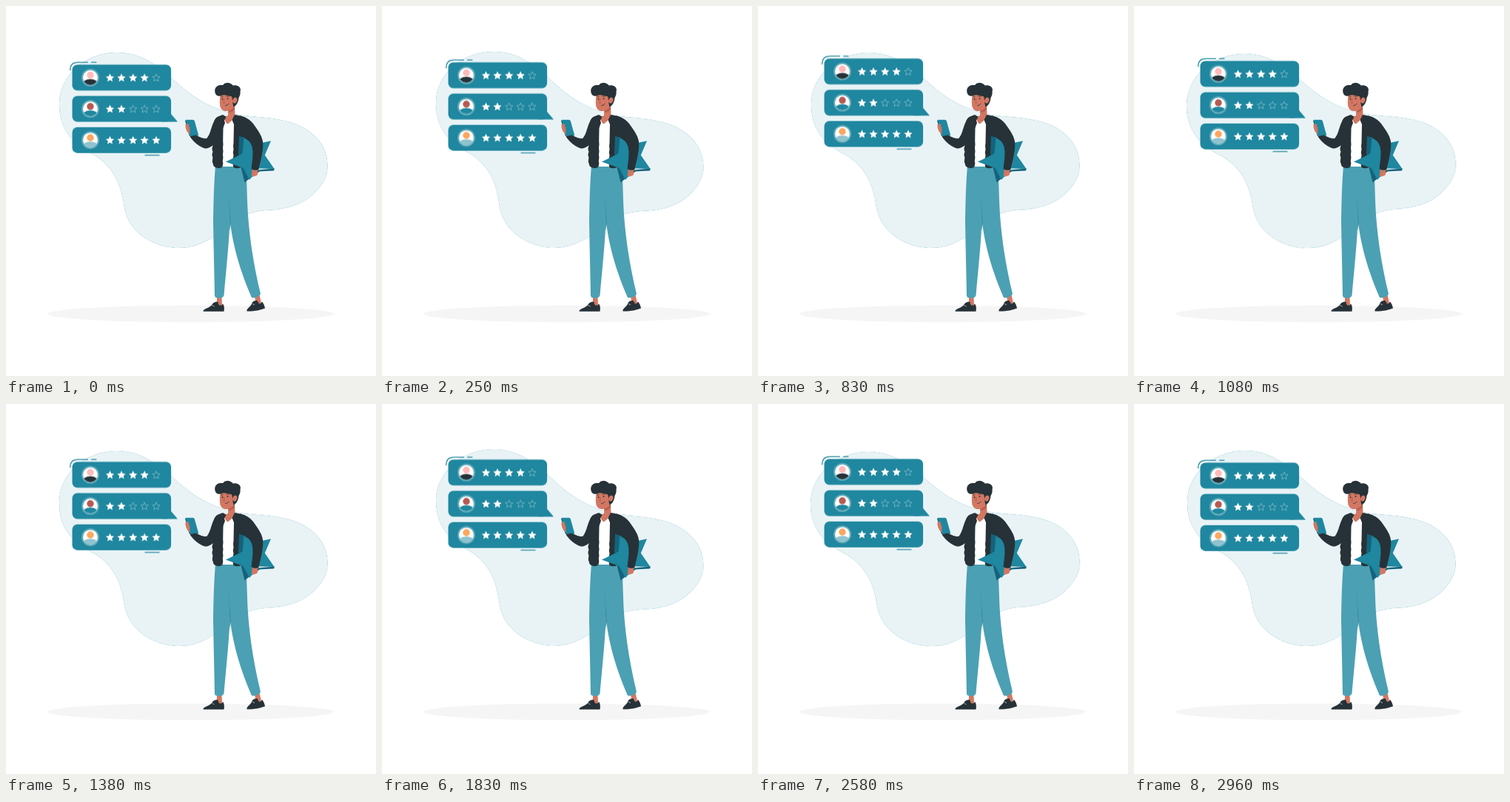
These frames come from a looping animation (500x500 px, 3000 ms). An HTML page:

```html
<!DOCTYPE html>
<html lang="en">
<head>
<meta charset="utf-8">
<title>Customer ratings</title>
<style>
  html, body { margin: 0; width: 100%; height: 100%; overflow: hidden; background: #fff; }
  svg { display: block; width: 100vw; height: 100vh; }

  .teal { fill: #1f879f; }
  .deep { fill: #14637a; }
  .pants { fill: #4ca0b3; }
  .dark { fill: #263238; }
  .skin { fill: #d27762; }
  .white { fill: #fff; }
  .line { fill: none; stroke: #1f879f; stroke-width: 1.2; stroke-linecap: round; }
  .ink { fill: none; stroke: #263238; stroke-width: .8; stroke-linecap: round; }

  /* Linear motion held at 24 pictures a second, each taken mid-step. */
  .blob { transform-box: fill-box; transform-origin: center; animation: sway 1.5s -5ms infinite; }
  .bubbles { animation: lift 1.5s -5ms infinite; }

  @keyframes sway {
    0% { transform: rotate(.0556deg); animation-timing-function: steps(9); }
    25% { transform: rotate(1.0556deg); animation-timing-function: steps(18); }
    75% { transform: rotate(-.9444deg); animation-timing-function: steps(9); }
    100% { transform: rotate(.0556deg); }
  }
  @keyframes lift {
    0% { transform: translateY(-.278px); animation-timing-function: steps(18); }
    50% { transform: translateY(-9.722px); animation-timing-function: steps(18); }
    100% { transform: translateY(.278px); }
  }
</style>
</head>
<body>
<svg viewBox="0 0 500 500">
  <defs>
    <path id="shape" d="M150 63C107 63 72 94 72 133C72 166 90 186 115 199C140 212 153 234 158 260C160 272 161 285 172 299C188 318 212 327 234 327C262 327 285 310 300 297C316 284 330 278 350 276C372 275 394 272 413 256C428 243 435 229 434.5 215C434 194 424 178 404 165.500C385 154 360 151.500 330 149C295 146 265 133 238 110C215 90 190 63 150 63Z"/>
    <path id="star" d="M0-6 1.7-2.2 5.7-1.8 2.7.9 3.5 4.9 0 2.8-3.5 4.9-2.7.9-5.7-1.8-1.7-2.2Z"/>
    <use id="full" href="#star" fill="#fff"/>
    <use id="empty" href="#star" fill="none" stroke="#8fc3cf" stroke-width=".8" transform="scale(.9)"/>
    <clipPath id="round"><circle cx="114" cy="17.5" r="10"/></clipPath>
    <g id="card">
      <rect class="teal" x="89.5" width="133.6" height="35" rx="7"/>
      <circle cx="114" cy="17.5" r="12" fill="#62abbb"/>
      <circle class="white" cx="114" cy="17.5" r="10"/>
      <use href="#full" x="140.5" y="18"/>
      <use href="#full" x="156" y="18"/>
    </g>
    <g id="body" clip-path="url(#round)">
      <ellipse cx="114" cy="27" rx="11" ry="7.5"/>
    </g>
  </defs>

  <g class="blob">
    <use href="#shape" class="teal"/>
    <use href="#shape" class="white" opacity=".9"/>
  </g>
  <ellipse cx="249.5" cy="416" rx="193.5" ry="11.3" fill="#f5f5f5"/>

  <g class="bubbles">
    <path class="line" d="M86.7 87C86.7 79.5 90 76.300 97 76.300H110.5M115.5 76.300H122"/>
    <path class="line" d="M188 201.900H207"/>
    <path class="teal" d="M222 145 232 156.700H210Z"/>
    <g transform="translate(0 79.5)">
      <use href="#card"/>
      <use href="#body" fill="#263238"/>
      <circle cx="114" cy="14.3" r="4.7" fill="#ffb9b9"/>
      <use href="#full" x="171.7" y="18"/>
      <use href="#full" x="187.2" y="18"/>
      <use href="#empty" x="203" y="18"/>
    </g>
    <g transform="translate(0 121.7)">
      <use href="#card"/>
      <use href="#body" fill="#1f879f"/>
      <circle cx="114" cy="14.3" r="4.7" fill="#b55b52"/>
      <use href="#empty" x="171.7" y="18"/>
      <use href="#empty" x="187.2" y="18"/>
      <use href="#empty" x="203" y="18"/>
    </g>
    <g transform="translate(0 163.9)">
      <use href="#card"/>
      <use href="#body" fill="#8fc3cf"/>
      <circle cx="114" cy="14.3" r="4.7" fill="#fba75f"/>
      <use href="#full" x="171.7" y="18"/>
      <use href="#full" x="187.2" y="18"/>
      <use href="#full" x="203" y="18"/>
    </g>
  </g>

  <!-- feet and legs -->
  <path class="skin" d="M285 393H291.5L292 405H285ZM336 392 342.5 390 345 402 338 404Z"/>
  <path class="dark" d="M266.500 412.800C266 409 275 408.500 278.500 403.500C280 400.500 283 399.500 286 399.500L288 404.500 291.500 404.500 293 402.500C295 404.500 295.300 409 294.500 412.800Z"/>
  <path class="dark" d="M325.500 412.500C324.500 409 331 406.500 332.500 401.500C333.500 398.500 337 398 339.500 398L342 402.500 344.500 401.800 345.800 399.500C348 401.500 349.500 405 350 408.500C344 411 335 412.800 325.500 412.500Z"/>
  <path d="M278.500 404.500 281.500 406M333 402.500 336 404" stroke="#fff" stroke-width=".6"/>
  <path class="pants" d="M298 217H324.5L326 262C327 300 333.500 346 344 389C342 393 337 395 332 394C313 350 303 312 300 262Z"/>
  <path class="pants" d="M283 216H320L301 247C301.500 262 303 280 302 302C300 335 297 362 294.5 391C294 395.5 283 396 282 392C281.5 360 280.5 325 280 290C280.5 262 281 240 283 216Z"/>
  <path d="M300.300 246 303.800 294 302 304C303 280 301.300 262 300.300 246Z" fill="#37859a"/>

  <!-- shirt and neck -->
  <path class="white" d="M292 152 311 150 312 217H292Z"/>
  <path class="skin" d="M300.5 137 309 133 309.5 148 308 152C305 155 302 158 299.5 159.5C297 158 295.5 155 295 150L300 148Z"/>
  <path d="M300.5 140C304 141 307 138 309 135V140C306 143 303 144 300.5 144Z" fill="#b95f50"/>

  <!-- head -->
  <path class="skin" d="M290.500 117C288.500 125 288.500 131 289.500 136C290.500 141.500 298 144 303 140.500C308 137.500 312 132 313 126L311 115Z"/>
  <path class="dark" d="M283 118.500C280 111 286 105.500 293 107C296 102.500 303 102.500 307 107.500C313 106 318.500 110 316.500 115.500C317 119 316 121.500 314.500 124C314 130 311.500 134.500 307.500 136.500C306 132 306.500 127 305 122C300 121.500 295 118.500 290.500 121.500C287 122 284.500 121.500 283 118.500Z"/>
  <ellipse class="skin" cx="309.300" cy="127.500" rx="3" ry="4" transform="rotate(20 309.3 127.5)"/>
  <circle class="dark" cx="292.6" cy="126" r=".9"/>
  <circle class="dark" cx="299.5" cy="125.2" r=".9"/>
  <path class="ink" d="M290.8 123.200 293 122.700M298 121.700 301 122.200M296.5 134.500C298.5 134.5 300 133.5 301 132"/>
  <path d="M295.5 126 293.8 131 296 131.3" fill="none" stroke="#a85244" stroke-width=".7"/>

  <!-- jacket back and right panel -->
  <path class="dark" d="M309 147C318 148 326 152 331 159L332 186 318 190V218C313 220 308 219.5 307 217Q306 213 307.500 210Q306 206 307.500 202Q306 198 307.500 194Q306.500 189 307.500 185L308 160 305.5 154Z"/>

  <!-- big star -->
  <path class="deep" d="M315 176 322 177.5 335 222 363 219.5 362 222.5 343 223.5 328 234 322.5 238.5 317.500 218 314 199Z"/>
  <path class="teal" d="M321.5 178 336 187 358 182.300 349.800 201.500 362.500 220 342 219.500 329 235 320.500 219 297 210.500 319.500 199.500Z"/>

  <!-- right hand and arm -->
  <path class="skin" d="M333 218 339.5 219.5C341 223 340.5 227 339 229L332.5 231C331 229 333 223 333 218Z"/>
  <path class="dark" d="M316 148C325 150 331.500 155 335.500 161C341 169 347.300 177 347.300 186.500C347.300 199 343.500 211 341.300 221C338 222.5 334 222 331.5 220C333 208 334.5 199 332.5 190C330 181 322 178 317 171Z"/>

  <!-- left arm, phone and panel -->
  <path class="skin" d="M244 162 246 171 250 178 256 174 253 166Z"/>
  <path class="deep" d="M242 155 243.5 153.8 250 175.5 247.8 175.500Z"/>
  <path class="teal" d="M243 153.800H252.5C254 153.8 254.5 154.5 255 156L260 174C260.3 175.2 259.7 175.7 258.7 175.700H249Z"/>
  <path class="skin" d="M242.500 160.500C243.500 159.500 246.500 159 247.300 160.200C248 161.500 246.500 162.500 246.500 163.200C248.500 163 249 165 247.500 166C249.200 166.300 249.300 168.200 248 169L249 173.500C245 172 242.200 166 242.500 160.500Z"/>
  <path class="dark" d="M248.500 176 256.500 174.500C262 177.500 267 179.5 271 179C276 174 277 164 281 156C283 150 288 148 293 148L296 158 288 178C283 186 276 193 269 192.5C261 190 253 184 248.500 176Z"/>
  <path class="dark" d="M293 147C289 148 285 151 283 155L280 181Q278 185 279.5 189Q277.5 193 279.5 197Q277.5 201 279.5 205Q278 210 280 214C280 219 290 221 292.5 217Q294 213 292.800 209Q294 205 293 201Q294 196 293 192Q294 187 293.200 183L293.500 165 294.500 156 297.5 149.500Z"/>
</svg>
</body>
</html>
```
